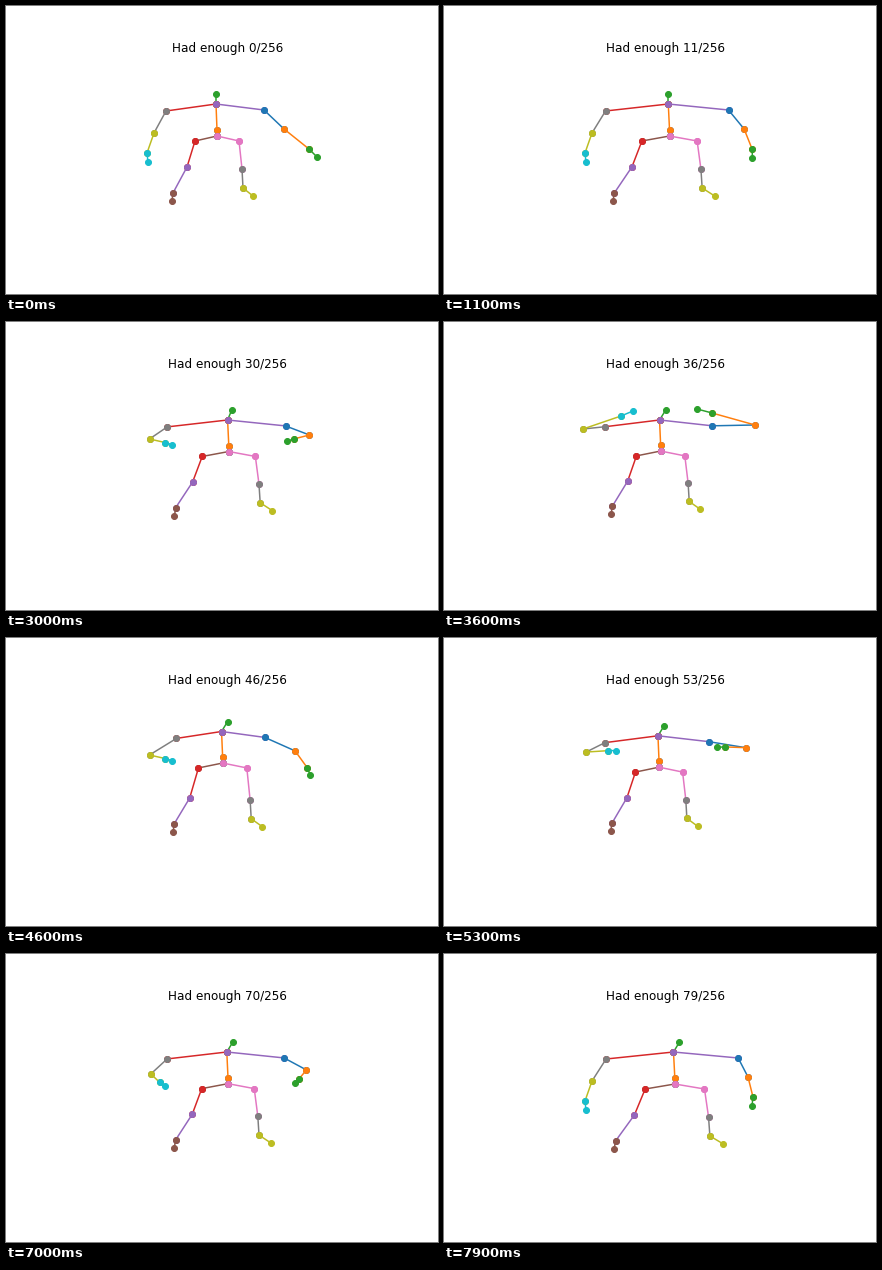
These frames come from a looping animation (432x288 px, 8000 ms). A matplotlib script:

```python
import numpy as np
import matplotlib.pyplot as plt
from matplotlib.animation import FuncAnimation

W, H, DPI = 432, 288, 72
FRAMES, STEP = 80, 100


def points(*xy):
    return np.array(xy, float).reshape(-1, 2)


# Standing figure; limbs run from the body outwards
trunk = points(211, 130, 211, 124, 210, 98, 210, 88)
shoulders = points(160, 105, 258, 104)
left_leg = points(189, 135, 181, 161, 167, 187, 166, 195)
right_leg = points(233, 135, 236, 163, 237, 182, 247, 190)
body = np.vstack([trunk, shoulders, left_leg, right_leg])

# Elbow, wrist and hand in each arm position
left_down = points(148, 127, 141, 147, 142, 156)
left_up = points(139, 107, 177, 94, 189, 89)
right_out = points(278, 123, 303, 143, 311, 151)
right_down = points(304, 123, 309, 143, 308, 152)
right_up = points(311, 103, 268, 91, 253, 87)

HIP, SPINE, NECK, HEAD = range(4)
LIMBS = L_ARM, R_ARM, L_LEG, R_LEG = 4, 8, 12, 16
bones = [(HIP, SPINE), (SPINE, NECK), (NECK, HEAD)]
bones += [(NECK, L_ARM), (NECK, R_ARM), (HIP, L_LEG), (HIP, R_LEG)]
bones += [(s + k, s + k + 1) for s in LIMBS for k in range(3)]


def ease(t, start, end):
    u = np.clip((t - start) / (end - start), 0, 1)
    return u * u * (3 - 2 * u)


def mix(a, b, u):
    return a + (b - a) * u


def lift(t, fall):
    """Arm height 0..1: raised twice, first lowered from time `fall`."""
    first = ease(t, 27, 33) - ease(t, fall, fall + 10)
    second = ease(t, 50, 55) - ease(t, 64, 74)
    return max(first, second)


def turn_at(t):
    """How far the figure faces the viewer; widens the stance."""
    return (0.85 * ease(t, 0, 11) + 0.2 * ease(t, 11, 23)
            - 0.72 * ease(t, 26, 34) - 0.12 * ease(t, 46, 56)
            + 0.95 * ease(t, 62, 79))


def joints_at(t):
    turn = turn_at(t)
    left, right = lift(t, 41), lift(t, 38)
    shrug = np.exp(-((t - 46) / 4) ** 2)

    p = body.copy()
    x, y = p.T
    x += 0.3 * turn * (x - 154)
    y -= 0.03 * left * (y - 98)
    p[HEAD, 0] += 6 * ease(t, 25, 33)
    p[4:6, 0] = mix(p[4:6, 0], p[NECK, 0], 0.18 * shrug)
    y[y < 140] -= 4.5 * shrug

    left_arm = mix(left_down, left_up, left)
    right_arm = mix(mix(right_out, right_down, min(turn, 1)), right_up, right)
    right_arm[:, 1] -= 8 * shrug
    return np.vstack([p[:4], p[4], left_arm, p[5], right_arm, p[6:]])


fig = plt.figure(figsize=(W / DPI, H / DPI), dpi=DPI, facecolor="white")
ax = fig.add_axes([0, 0, 1, 1])
ax.set(xlim=(0, W), ylim=(H, 0))
ax.axis("off")

lines = [ax.plot([], [], "o-", color=f"C{n % 10}", lw=1.5, ms=6)[0]
         for n in range(len(bones))]
title = fig.text(0.5125, 241.7 / H, "", ha="center", va="baseline",
                 fontsize=12, family="DejaVu Sans")


def update(n):
    joints = joints_at(n)
    for line, bone in zip(lines, bones):
        line.set_data(*joints[list(bone)].T)
    title.set_text(f"Had enough {n}/256")
    return [*lines, title]


anim = FuncAnimation(fig, update, frames=FRAMES, interval=STEP,
                     repeat=True, repeat_delay=0, blit=False)
plt.show()
```
